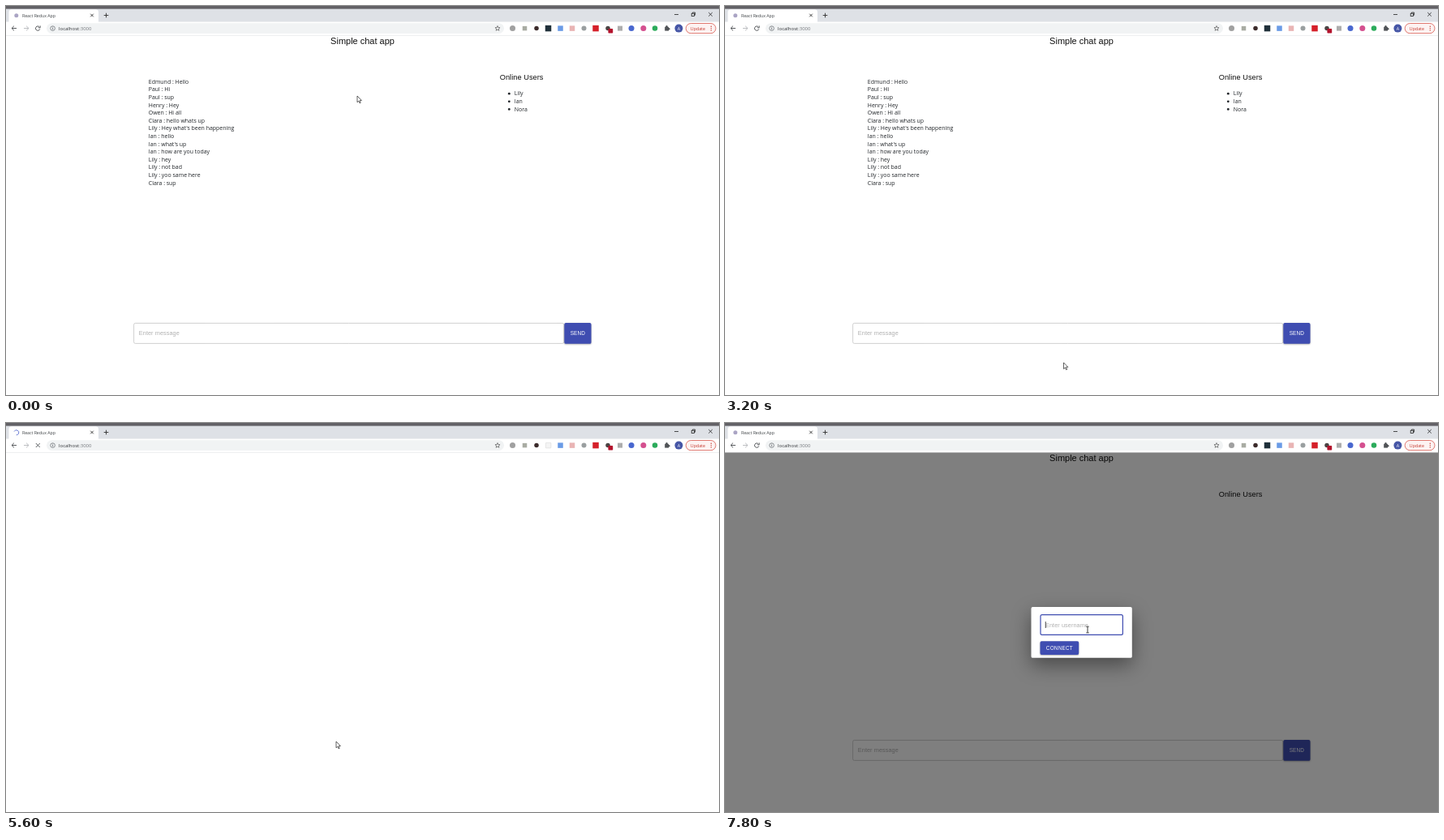
An HTML page with a canvas for the animation above (8 s loop, 879 px wide and 480 px high).

```html
<!DOCTYPE html>
<html lang="en">
<head>
<meta charset="utf-8">
<title>Simple chat app</title>
<style>
  html, body { margin: 0; width: 100%; height: 100%; overflow: hidden; background: #fff; }
  canvas { display: block; width: 879px; height: 480px; }
</style>
</head>
<body>
<canvas id="stage"></canvas>
<script>
const W = 879, H = 480, LOOP = 8000, STEP = 200;
const canvas = document.getElementById('stage');
const ctx = canvas.getContext('2d');
const dpr = window.devicePixelRatio || 1;
canvas.width = W * dpr;
canvas.height = H * dpr;

const ARIAL = '"Liberation Sans", Arial, sans-serif';
const UI = '"Open Sans", "Noto Sans", sans-serif';
const BLUE = '#3f4db1';

const messages = [
  'Edmund : Hello', 'Paul : Hi', 'Paul : sup', 'Henry : Hey', 'Owen : Hi all',
  'Clara : hello whats up', "Lily : Hey what's been happening", 'Ian : hello',
  "Ian : what's up", 'Ian : how are you today', 'Lily : hey', 'Lily : not bad',
  'Lily : yoo same here', 'Clara : sup'
];
const users = ['Lily', 'Ian', 'Nora'];

// Pointer path: time, x, y
const path = [
  [0, 433, 111], [600, 446, 108], [1000, 446, 108], [1400, 451, 107],
  [2000, 458, 91], [2200, 503, 284], [2400, 503, 284], [2600, 471, 383],
  [3000, 440, 470], [3400, 395, 410], [3800, 382, 404], [4000, 382, 404],
  [4600, 395, 411], [5200, 425, 415], [5400, 417, 402], [5600, 407, 393],
  [5800, 402, 392], [6400, 404, 395], [6600, 425, 330], [6800, 447, 255],
  [LOOP, 447, 255]
];

// Toolbar extensions: x, colour, shape, size
const extensions = [
  [624.5, '#a0a0a0', 'circle', 7], [639.5, '#a9aca3', 'square', 5.5],
  [654, '#3c2b2b', 'circle', 5.5], [668.5, '#20303a', 'square', 7.5],
  [683.5, '#6a9be6', 'square', 6.5], [698, '#e9b4b4', 'square', 6.5],
  [712.5, '#9a9fa0', 'circle', 6], [727, '#d5202a', 'square', 7.5],
  [742, '#4a4444', 'circle', 5.5], [757, '#adadad', 'square', 6],
  [771, '#4967cf', 'circle', 7], [785.8, '#d4508f', 'circle', 7],
  [800, '#2bab5b', 'circle', 6.5]
];

function text(str, x, y, size, color, family = UI, spacing = 0, align = 'left') {
  ctx.font = `${size}px ${family}`;
  ctx.letterSpacing = spacing + 'px';
  ctx.textAlign = align;
  ctx.fillStyle = color;
  ctx.fillText(str, x, y);
}

function rect(x, y, w, h, color) {
  ctx.fillStyle = color;
  ctx.fillRect(x, y, w, h);
}

function round(x, y, w, h, r, fill, stroke, width = 1) {
  ctx.beginPath();
  ctx.roundRect(x, y, w, h, r);
  if (fill) { ctx.fillStyle = fill; ctx.fill(); }
  if (stroke) { ctx.strokeStyle = stroke; ctx.lineWidth = width; ctx.stroke(); }
}

function disc(x, y, r, color) {
  ctx.beginPath();
  ctx.arc(x, y, r, 0, Math.PI * 2);
  ctx.fillStyle = color;
  ctx.fill();
}

function arc(x, y, r, from, to, color, width) {
  ctx.beginPath();
  ctx.arc(x, y, r, from, to);
  ctx.strokeStyle = color;
  ctx.lineWidth = width;
  ctx.stroke();
}

function line(points, color, width = 1) {
  ctx.beginPath();
  for (let i = 0; i < points.length; i += 2) {
    if (i) ctx.lineTo(points[i], points[i + 1]);
    else ctx.moveTo(points[i], points[i + 1]);
  }
  ctx.strokeStyle = color;
  ctx.lineWidth = width;
  ctx.stroke();
}

function cross(x, y, r, color, width) {
  line([x - r, y - r, x + r, y + r], color, width);
  line([x - r, y + r, x + r, y - r], color, width);
}

function shadow(color, blur, dy) {
  ctx.shadowColor = color;
  ctx.shadowBlur = blur * dpr;
  ctx.shadowOffsetY = dy * dpr;
}

function button(label, x, y, w, h) {
  ctx.save();
  shadow('rgba(0,0,0,.35)', 2, 0.8);
  round(x, y, w, h, 1.9, BLUE);
  ctx.restore();
  text(label, x + w / 2, y + h / 2 + 2.3, 6.41, '#fff', ARIAL, 0.183, 'center');
}

function field(hint, x, y, w, h, state) {
  const color = state.focus ? BLUE : state.hover ? '#212121' : '#c4c4c4';
  const inset = state.focus ? 0.6 : 0.4;
  round(x + inset, y + inset, w - inset * 2, h - inset * 2, 1.9, null, color, state.focus ? 1.2 : 0.8);
  text(hint, x + 6.6, y + h / 2 + 2.5, 7.32, '#b0b0b0', ARIAL, 0.069);
  if (state.caret) rect(x + 6.4, y + h / 2 - 4, 0.8, 8, '#222');
}

function drawTabs(loading, t) {
  rect(0, 0, W, 20, '#dee1e6');
  rect(0, 0, W, 3.6, '#626166');
  round(3.5, 4.2, 110.5, 18, [3.5, 3.5, 0, 0], '#fff');
  if (loading) {
    const a = t / 160;
    arc(12.8, 11.8, 3, a, a + 4.3, '#5c6fd0', 0.9);
  } else {
    disc(12.8, 11.8, 2.5, '#aaa4c4');
  }
  text('React Redux App', 20, 13.5, 5.2, '#3c4043');
  cross(106, 11.5, 1.8, '#333', 0.9);
  line([120.7, 11.5, 126.3, 11.5], '#333', 0.9);
  line([123.5, 8.7, 123.5, 14.3], '#333', 0.9);
  line([824, 10.5, 829, 10.5], '#222', 0.8);
  ctx.strokeStyle = '#222';
  ctx.lineWidth = 0.8;
  ctx.strokeRect(845.2, 9.2, 3.2, 3.2);
  line([846.4, 9, 846.4, 8, 849.6, 8, 849.6, 11.2, 848.6, 11.2], '#222', 0.8);
  cross(868.5, 10.3, 2.3, '#222', 0.8);
}

function drawArrow(x, dir, color) {
  line([x - 3 * dir, 27.5, x + 3 * dir, 27.5], color, 0.9);
  line([x, 24.6, x + 3 * dir, 27.5, x, 30.4], color, 0.9);
}

function drawStar(x, y) {
  const pts = [];
  for (let i = 0; i <= 10; i++) {
    const r = i % 2 ? 1.4 : 3.2, a = i * Math.PI / 5 - Math.PI / 2;
    pts.push(x + r * Math.cos(a), y + r * Math.sin(a));
  }
  line(pts, '#555', 0.7);
}

function drawToolbar(loading, blank) {
  rect(0, 19.5, W, 17, '#fff');
  drawArrow(10, -1, '#4a4d51');
  drawArrow(25, 1, '#b5b7ba');
  if (loading) {
    cross(39.3, 27.5, 2.5, '#4a4d51', 0.9);
  } else {
    arc(39.2, 27.6, 2.7, 0.3, 5.5, '#4a4d51', 0.9);
    line([42.2, 24.4, 42.2, 26.8, 39.8, 26.8], '#4a4d51', 0.9);
  }

  round(50, 21.3, 564, 12.6, 6.3, '#f1f3f4');
  arc(57.6, 27.6, 2.8, 0, 7, '#5f6368', 0.7);
  line([57.6, 27.1, 57.6, 29.2], '#5f6368', 0.8);
  rect(57.2, 25.7, 0.8, 0.8, '#5f6368');
  text('localhost', 65, 29.8, 6, '#2f3236');
  text(':3000', 65 + ctx.measureText('localhost').width, 29.8, 6, '#74787d');
  drawStar(606, 27.7);

  for (const [x, color, shape, size] of extensions) {
    if (blank && x === 668.5) round(665.3, 24.3, 6.6, 6.6, 0.6, '#f4f4f4', '#d8d8d8', 0.6);
    else if (shape === 'circle') disc(x, 27.6, size / 2, color);
    else rect(x - size / 2, 27.6 - size / 2, size, size, color);
  }
  round(742.4, 28, 5.8, 5.6, 0.8, '#b3122c');

  rect(812.2, 25.8, 4.8, 4.8, '#505357');
  disc(814.5, 25.3, 1.2, '#505357');
  disc(817.3, 28.2, 1.2, '#505357');
  disc(829.4, 27.6, 5, '#4656a6');
  text('A', 829.4, 29.6, 5.4, '#fff', UI, 0, 'center');
  round(838.2, 21.5, 36.8, 12.2, 6.1, '#fdf3f2', '#d9584f', 0.8);
  text('Update', 843.8, 29.5, 5.3, '#c5372d');
  for (let i = -1; i <= 1; i++) disc(869.3, 27.6 + i * 2.3, 0.7, '#c5372d');
  rect(0, 36, W, 0.6, '#e3e4e6');
}

function drawPage(loggedIn, state) {
  text('Simple chat app', 439.5, 47.2, 10.99, '#111', ARIAL, 0, 'center');
  text('Online Users', 608.7, 91.2, 9.16, '#111', ARIAL, 0.069);
  if (loggedIn) {
    messages.forEach((m, i) => text(m, 175.8, 95.7 + i * 9.615, 6.95, '#212529'));
    users.forEach((name, i) => {
      const y = 110.3 + i * 9.615;
      disc(620.3, y - 2.1, 1.4, '#212529');
      text(name, 626.8, y, 6.95, '#212529');
    });
  }
  field('Enter message', 157.2, 391, 531, 25.8, state);
  button('SEND', 688.3, 391, 33.2, 25.8);
}

function drawDialog(fade, state) {
  rect(0, 36.5, W, H - 36.5, `rgba(0,0,0,${0.5 * fade})`);
  ctx.save();
  ctx.globalAlpha = fade;
  ctx.save();
  shadow('rgba(0,0,0,.42)', 24, 9);
  round(377.5, 227, 124.3, 62.8, 1.9, '#fff');
  ctx.restore();
  field('Enter username', 388.4, 236, 102.6, 26, state);
  button('CONNECT', 388.5, 269.2, 47.7, 16.8);
  ctx.restore();
}

function pointerAt(t) {
  let i = 0;
  while (i < path.length - 2 && t >= path[i + 1][0]) i++;
  const [t0, x0, y0] = path[i], [t1, x1, y1] = path[i + 1];
  const k = (t - t0) / (t1 - t0);
  return { x: x0 + (x1 - x0) * k, y: y0 + (y1 - y0) * k };
}

function drawPointer(x, y, kind) {
  ctx.save();
  ctx.translate(x, y);
  if (kind === 'text') {
    line([0, -3.6, 0, 3.6], '#222', 0.9);
    line([-1.7, -3.8, 1.7, -3.8], '#222', 0.8);
    line([-1.7, 3.8, 1.7, 3.8], '#222', 0.8);
  } else if (kind === 'resize') {
    line([0, -4, 0, 4], '#333', 0.9);
    line([-2, -2.4, 0, -4.4, 2, -2.4], '#333', 0.8);
    line([-2, 2.4, 0, 4.4, 2, 2.4], '#333', 0.8);
  } else {
    ctx.beginPath();
    for (const [px, py] of [[0, 0], [0, 7.8], [1.8, 6.2], [3, 8.9], [4.2, 8.4], [3, 5.7], [5.4, 5.6]]) ctx.lineTo(px, py);
    ctx.closePath();
    ctx.fillStyle = '#fff';
    ctx.fill();
    ctx.strokeStyle = '#222';
    ctx.lineWidth = 0.7;
    ctx.stroke();
  }
  ctx.restore();
}

const inside = (p, x, y, w, h) => p.x > x && p.x < x + w && p.y > y && p.y < y + h;
const blink = (t, start) => t >= start && Math.floor((t - start) / 530) % 2 === 0;

function draw(time) {
  const t = Math.floor((time % LOOP) / STEP) * STEP;
  const p = pointerAt(t);
  const loading = t >= 5400 && t < 6000;
  const blank = t === 5600;
  const modal = t > 5600;
  const overMessage = !modal && !blank && inside(p, 157, 391, 531, 26);
  const overName = modal && inside(p, 388, 236, 103, 26);

  ctx.setTransform(dpr, 0, 0, dpr, 0, 0);
  rect(0, 0, W, H, '#fff');
  drawTabs(loading, t);
  drawToolbar(loading, blank);
  if (!blank) {
    drawPage(!modal, {
      focus: t >= 3650 && !modal,
      hover: overMessage,
      caret: !modal && blink(t, 3650)
    });
  }
  if (modal) {
    drawDialog(Math.min(1, (t - 5600) / 207), {
      focus: t >= 6650,
      hover: overName,
      caret: blink(t, 6650)
    });
  }
  const resizing = t >= 1400 && t < 2000;
  drawPointer(p.x, p.y, overMessage || overName ? 'text' : resizing ? 'resize' : 'arrow');
}

const start = performance.now();
function tick() {
  draw(performance.now() - start);
  requestAnimationFrame(tick);
}
tick();
</script>
</body>
</html>
```
